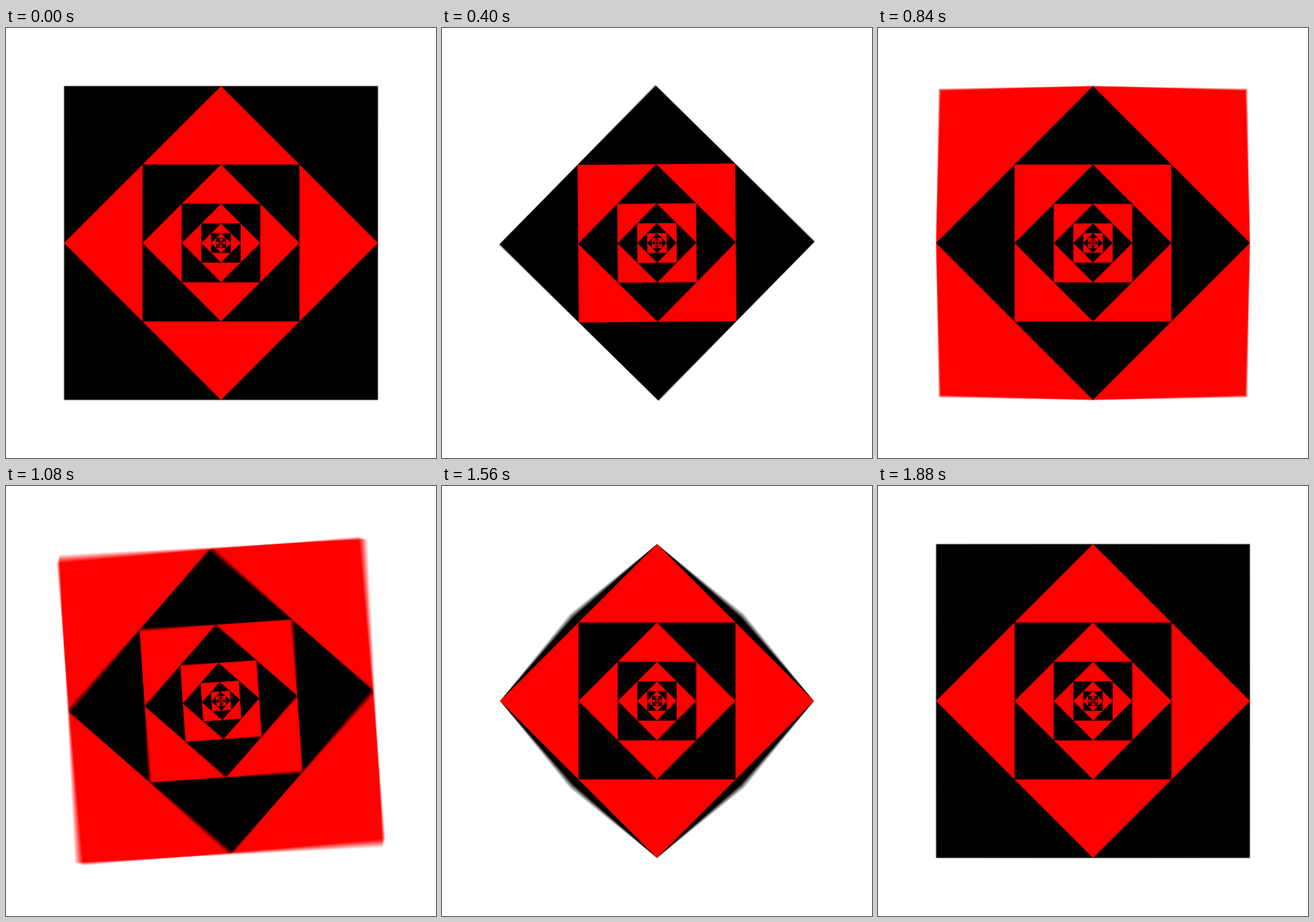
Write an HTML page with a canvas that moves like this. It is 500 by 500 pixels and loops after 1920 ms.

```html
<!DOCTYPE html>
<html lang="en">
<head>
<meta charset="utf-8">
<title>Nested squares</title>
<style>
  html, body { margin: 0; height: 100%; overflow: hidden; background: #fff; }
  canvas { display: block; width: 100vw; height: 100vh; }
</style>
</head>
<body>
<canvas id="stage" width="500" height="500"></canvas>
<script>
const SIZE = 500, HALF = 182.5, LEVELS = 17;
const FRAME = 40, FRAMES = 48, PHASE = 12;
const SHUTTER = 0.7, SAMPLES = 16;
const COLORS = ['#000', '#f00'];

const screen = document.getElementById('stage').getContext('2d');
const buffer = document.createElement('canvas');
buffer.width = buffer.height = SIZE;
const ctx = buffer.getContext('2d');

const clamp = x => Math.min(1, Math.max(0, x));
const ease = p => p < 0.5 ? 4 * p ** 3 : 1 - 4 * (1 - p) ** 3;

function polygon(count, start, radius, color) {
  ctx.beginPath();
  for (let i = 0; i < count; i++) {
    const angle = start + i * 2 * Math.PI / count;
    const r = radius(i);
    ctx.lineTo(SIZE / 2 + r * Math.cos(angle), SIZE / 2 + r * Math.sin(angle));
  }
  ctx.fillStyle = color;
  ctx.fill();
}

// Each half loop turns and shrinks the nest, then grows a new outer square.
function drawPose(time) {
  const half = Math.floor(time / (2 * PHASE)) % 2;
  const local = time % (2 * PHASE);
  const turn = ease(clamp(local / PHASE));
  const grow = ease(clamp(local / PHASE - 1));

  ctx.fillStyle = '#fff';
  ctx.fillRect(0, 0, SIZE, SIZE);

  if (grow > 0) {
    const corner = HALF * Math.SQRT1_2 * (1 + grow);
    polygon(8, 0, i => i % 2 ? corner : HALF, COLORS[1 - half]);
  }

  const spin = (half ? -1 : 1) * turn * Math.PI / 4;
  const outer = HALF * Math.SQRT2 * (1 - (1 - Math.SQRT1_2) * turn);
  for (let n = 0; n < LEVELS; n++) {
    const r = outer * Math.SQRT1_2 ** n;
    polygon(4, spin + (n + 1) * Math.PI / 4, () => r, COLORS[(half + n) % 2]);
  }
}

let shown = -1;

function render(now) {
  const frame = Math.floor((now + 1) / FRAME) % FRAMES;
  if (frame !== shown) {
    shown = frame;
    // A running average of the samples gives motion blur.
    for (let i = 0; i < SAMPLES; i++) {
      drawPose(frame + SHUTTER * i / SAMPLES);
      screen.globalAlpha = 1 / (i + 1);
      screen.drawImage(buffer, 0, 0);
    }
  }
  requestAnimationFrame(render);
}

render(0);
</script>
</body>
</html>
```
